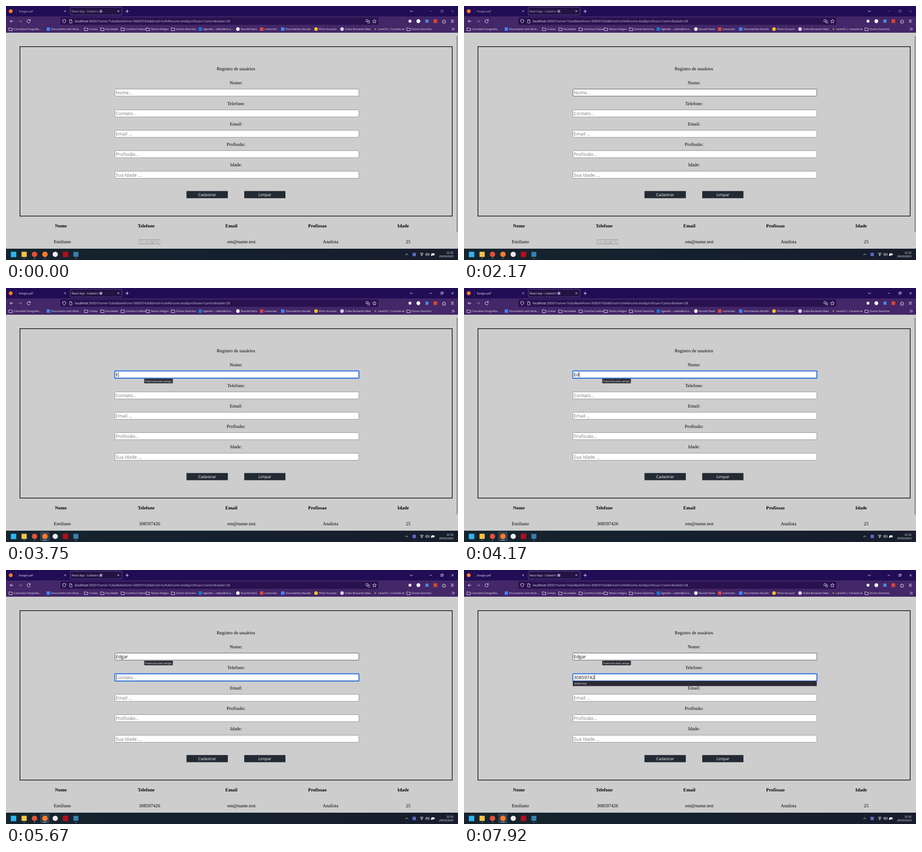
An HTML page that plays this animation: 998 px wide and 561 px high, repeating every 8 s.

```html
<!DOCTYPE html>
<html lang="pt-BR">
<head>
<meta charset="utf-8">
<title>Cadastro</title>
<style>
html, body { margin: 0; width: 100%; height: 100%; overflow: hidden; background: #cdcdcd; }
svg { display: block; width: 998px; height: 561px; }
text { font-family: "Open Sans", "Noto Sans", sans-serif; text-rendering: geometricPrecision; white-space: pre; }
.page { font-family: "Liberation Serif", "Times New Roman", serif; font-size: 10.4px; text-anchor: middle; }
.bold { font-weight: bold; }
.field { font-size: 10.1px; }
</style>
</head>
<body>
<svg id="stage" viewBox="0 0 998 561"></svg>
<script>
const LOOP = 8000;
const PHONE = '308597426';
const FIELD_Y = [183.5, 229.5, 274.5, 319.5, 365];
const HINTS = ['Nome...', 'Contato...', 'Email ...', 'Profissão...', 'Sua Idade ...'];
const LABELS = ['Nome:', 'Telefone:', 'Email:', 'Profissão:', 'Idade:'];

const rect = (x, y, w, h, fill, more = '') =>
  `<rect x="${x}" y="${y}" width="${w}" height="${h}" fill="${fill}" ${more}/>`;
const dot = (x, y, r, fill, more = '') => `<circle cx="${x}" cy="${y}" r="${r}" fill="${fill}" ${more}/>`;
const box = (x, y, size, fill) => rect(x - size / 2, y - size / 2, size, size, fill, 'rx="1"');
const line = (d, color = '#f4f0fa', width = 1, more = '') =>
  `<path d="${d}" fill="none" stroke="${color}" stroke-width="${width}" ${more}/>`;
const text = (x, y, s, size, fill = '#f4f0fa', more = '') =>
  `<text x="${x}" y="${y}" font-size="${size}" fill="${fill}" ${more}>${s.replace(/&/g, '&amp;')}</text>`;
const page = (x, y, s, more = '', bold = '') =>
  `<text x="${x}" y="${y}" class="page ${bold}" ${more}>${s}</text>`;
const cross = (x, y, r, more) => line(`M${x - r} ${y - r}l${2 * r} ${2 * r}m0 ${-2 * r}l${-2 * r} ${2 * r}`, '#f4f0fa', .9, more);
const folder = x => line(`M${x} 48.2h2.8l1 1h3.7v5.3h-7.5z`, '#f4f0fa', .9);

function tabBar() {
  return rect(0, 0, 998, 23.5, '#210d56') +
    dot(10.5, 11.5, 4.3, '#ff7a2f') +
    line('M22.5 3v17', '#4b3a78', .6) +
    rect(142, 2.5, 114, 17.5, '#231343', 'rx="2" stroke="#75659b" stroke-width=".8"') +
    '<g id="titles">' +
    text(28.5, 14, 'Estagio.pdf', 6) + text(145, 14, 'React App - Cadastro', 6.07) +
    box(209.5, 11.7, 6, '#a98bd6') + '</g>' +
    cross(130.5, 11.5, 1.8) + cross(248, 11.5, 1.8) +
    line('M264 11.7h7m-3.5-3.5v7') + line('M891.8 10l3.2 3.2 3.2-3.2') +
    '<g id="controls">' + line('M935.5 11.7h5', '#f4f0fa', .8) +
    rect(960, 10, 4, 4, 'none', 'stroke="#f4f0fa" stroke-width=".8"') +
    line('M961.3 10v-1.2h4v4h-1.3', '#f4f0fa', .7) + cross(986, 11.7, 2.4) + '</g>';
}

function toolbar() {
  const url = `localhost:3000/?name=Tubal&telefone=${PHONE}&Email=tu%40nume.test&profissao=Cantor&idade=28`;
  const dim = 'opacity=".4"';
  return rect(0, 23, 998, 36, '#432768') +
    rect(120, 25.2, 702, 16.2, '#29124f', 'rx="2"') +
    line('M16 33.7h-7m3-3l-3 3 3 3') + line('M27.5 33.7h7m-3-3l3 3-3 3', '#f4f0fa', 1, dim) +
    line('M53 31.6a3.6 3.6 0 1 0 .5 3M53.6 29.5v2.7h-2.7') +
    line('M128.5 29.5l3.3 1.3c.2 3.500-1 5.500-3.300 6.900c-2.300-1.400-3.500-3.400-3.300-6.900z') +
    line('M140.500 30h3.200l2 2v5.500h-5.200zm3 0v2.200h2', '#f4f0fa', .8) +
    `<text x="152" y="36.300" font-size="7" fill="#cfc5df"><tspan fill="#fff">localhost</tspan>${url.slice(9).replace(/&/g, '&amp;')}</text>` +
    line('M794.800 30h4.500v4.500h-4.500zm4 3h4.200v4.500h-4.200z', '#d9d0e8', .9) +
    line('M813.500 29.500l1.200 2.700 3 .3-2.200 2 .6 3-2.600-1.500-2.600 1.500.6-3-2.200-2 3-.3z', '#f4f0fa', .9) +
    box(892, 33.5, 6, '#eee8f6') + dot(910.5, 33.5, 4.2, '#fff') + box(929.5, 33.5, 7, '#4b86dc') + box(948, 33.5, 8, '#dc4530') +
    line('M964 32.200h2c-.6-2 2.400-2 1.900 0h2v1.800c1.800-.5 1.800 2.300 0 1.900v1.800h-5.900v-1.800c2 .4 2-2.400 0-1.900z', '#f4f0fa', .9) +
    line('M982.500 31h6m-6 2.500h6m-6 2.500h6', '#f4f0fa', .9);
}

function bookmarks() {
  const folders = [[6.5, 'Consultas Fotografia...'], [173, 'Contas'], [209, 'Faculdade'], [254, 'Cozinha Criativa'],
    [309.5, 'Textos Antigos'], [365, 'Outros favoritos'], [885, 'Outros favoritos']];
  const links = [[93.5, 'Documento sem título...', '#4285f4'], [429, 'Agendix – calendário e...', '#1c78cf'],
    [512, 'Nuvole Pasta', '#eef1f7', 1], [564.5, 'nume.test', '#e2483b'], [611, 'Documentos Nuvole', '#4285f4'],
    [684.5, 'Plimo Account', '#f5c32c', 1], [742, 'Clube Burvantis Mais', '#d9d0e8', 1], [815.5, 'LerenTo | Conecte-se', '#a57b5a']];
  return folders.map(([x, s]) => folder(x) + text(x + 10.3, 53.3, s, 5.85)).join('') +
    links.map(([x, s, color, round]) =>
      (round ? dot(x, 51, 3.9, color) : box(x, 51, x > 800 ? 3.5 : 7.4, color)) + text(x + 6.3, 53.3, s, 5.85)).join('') +
    line('M984.500 48.200l2.800 2.800-2.800 2.800m3.200-5.600l2.800 2.800-2.800 2.800');
}

function form() {
  const button = (x, w, s) => rect(x, 408.7, w, 15.8, '#232a34') +
    text(x + w / 2, 420, s, 8.75, '#fff', 'text-anchor="middle"');
  const fields = FIELD_Y.map((y, i) =>
    page(508, y - 10.9, LABELS[i]) +
    rect(240.5, y, 538.5, 15.5, '#fff', `id="frame${i}" rx="1" stroke="#8f8f9d" stroke-width="1"`) +
    `<text id="value${i}" class="field" x="242.3" y="${y + 11.5}" fill="#757575">${HINTS[i]}</text>`).join('');
  return rect(30.75, 89.75, 954.5, 374.2, 'none', 'stroke="#111" stroke-width="1.5"') +
    page(507.7, 141.5, 'Registro de usuários') + fields +
    button(398.5, 91.3, 'Cadastrar') + button(526, 91, 'Limpar');
}

function table() {
  const head = [[121.3, 'Nome'], [309.5, 'Telefone'], [497.5, 'Email'], [687.5, 'Profissao'], [877, 'Idade']];
  const row = [[124.5, 'Emiliano'], [519.8, 'em@nume.test'], [716.5, 'Analista'], [888, '25']];
  return head.map(([x, s]) => page(x, 488.5, s, '', 'bold')).join('') +
    row.map(([x, s]) => page(x, 524.3, s)).join('') +
    rect(293.3, 515, 47.5, 11.3, '#adadad', 'id="selection"') +
    page(317, 524.3, PHONE, 'id="phone"');
}

function taskbar() {
  const mark = x => rect(x - 1.5, 556.7, 3, 1.3, '#9aa3ad', 'rx=".6"');
  return '<defs><linearGradient id="bar"><stop stop-color="#15242d"/><stop offset=".5" stop-color="#15202e"/>' +
    '<stop offset="1" stop-color="#171d2c"/></linearGradient></defs>' +
    rect(0, 536, 998, 25, 'url(#bar)') +
    '<g id="active">' + rect(75.5, 538, 20.5, 21, '#34404d', 'rx="2"') + rect(81.5, 556.7, 8.5, 1.4, '#64b9ea', 'rx=".7"') + '</g>' +
    box(16.7, 548.7, 12, '#2fb4f0') + box(40, 548.5, 11.5, '#f5c344') + dot(63, 548.5, 6, '#e2503c') +
    dot(86, 548.5, 6, '#ff7a2f') + dot(108.7, 548.5, 5.8, '#f1ecf6') + box(131.5, 548.5, 12, '#b0101b') + box(154.3, 548.5, 11, '#377fae') +
    mark(40) + mark(63) + '<g id="idle">' + mark(86) + '</g>' + mark(154.3) +
    line('M882 550l2.700-2.700 2.700 2.700') + box(901.3, 548.7, 7.5, '#5b67c7') +
    line('M914 547.200a5.700 5.700 0 0 1 8 0m-6.500 1.700a3.600 3.600 0 0 1 5 0') + dot(918, 550.8, 1.2, '#fff') +
    line('M926.500 547.300h1.500l2-1.700v6l-2-1.700h-1.500zm5.500-.5q1.500 1.800 0 3.600m1.500-5q2.600 3.200 0 6.400', '#fff', .8) +
    rect(939.5, 546.2, 6, 4.5, '#fff', 'rx=".8"') + rect(946, 547.5, 1, 2, '#fff') + dot(940, 550, 1.8, '#fff') +
    text(988, 547, '22:32', 6, '#fff', 'text-anchor="end"') + text(988, 555, '29/03/2023', 6, '#fff', 'text-anchor="end"');
}

function overlays() {
  return rect(995, 65.5, 2, 434.5, '#858585', 'id="scroll" rx="1"') +
    rect(239.6, 0, 540.3, 17.3, 'none', 'id="glow" rx="2" stroke="#8ab0ea" stroke-width="2.4"') +
    rect(240.5, 0, 538.5, 15.5, 'none', 'id="ring" rx="1" stroke="#1559c8" stroke-width="1.3"') +
    rect(0, 0, .7, 11.5, '#000', 'id="caret"') +
    '<g id="tip">' + rect(305.3, 200.5, 63, 9.700, '#2b2a33', 'rx="1" stroke="#55545e" stroke-width=".6"') +
    text(307, 207.6, 'Preencha este campo.', 5.85, '#fbfbfe') + '</g>' +
    '<g id="list">' + rect(240.3, 0, 538.5, 10.800, '#2b2a33', 'stroke="#45444e" stroke-width=".5"') +
    '<text id="option" x="243" y="7.4" font-size="5.45" fill="#fbfbfe"></text></g>' +
    '<path id="mouse" d="M0 0v8.200l1.900-1.700 1.200 2.700 1.300-.6-1.200-2.600h2.600z" fill="#fff" stroke="#222" stroke-width=".7"/>';
}

document.getElementById('stage').innerHTML =
  rect(0, 0, 998, 561, '#cdcdcd') + tabBar() + toolbar() + bookmarks() + form() + table() + overlays() + taskbar();

const el = id => document.getElementById(id);
const set = (id, name, value) => el(id).setAttribute(name, value);
const show = (id, on) => set(id, 'opacity', +on);
// Last value whose start time has passed
const pick = (t, keys) => keys.reduce((v, [start, next]) => t >= start ? next : v, keys[0][1]);

const NAME = [[0, ''], [3750, 'E'], [4080, 'Ed'], [4250, 'Edg'], [4420, 'Edga'], [5170, 'Edgar']];
const CONTACT = [[0, ''], [6830, PHONE], [7920, PHONE.slice(0, -1)]];
const SCROLL = [[0, 1], [580, .5], [750, 0], [1580, 1], [5170, .8], [5420, .4], [5500, 0]];
const CARET = [[0, 0], [2330, 1], [2830, 0], [3420, 1], [5000, 0], [5170, 1], [5420, 0],
  [5670, 1], [6170, 0], [6670, 1], [7250, 0], [7750, 1]];
const LIST = [[0, -1], [3830, 0], [4170, -1], [6920, 1]];

function moveMouse(t) {
  const u = Math.min(1, Math.max(0, Math.floor((t - 1580) / 83) / 7));
  const p = u * u * (3 - 2 * u);
  const x = 699 - 393 * p, y = 300 - 109 * p;
  const hover = y < 199;
  set('mouse', 'transform', `translate(${x} ${y})`);
  show('mouse', t >= 1580 && !hover);
  set('frame0', 'stroke', hover ? '#55555f' : '#8f8f9d');
}

function fill(i, s) {
  el('value' + i).textContent = s || HINTS[i];
  set('value' + i, 'fill', s ? '#111' : '#757575');
}

function draw(t) {
  const active = t >= 2330, focus = t < 5670 ? 0 : 1;
  const values = [pick(t, NAME), pick(t, CONTACT)];
  values.forEach((s, i) => fill(i, s));
  moveMouse(t);

  show('scroll', pick(t, SCROLL));
  set('titles', 'opacity', active ? 1 : .75);
  set('controls', 'opacity', active ? 1 : .45);
  show('active', active);
  show('idle', !active);
  show('selection', !active);
  set('phone', 'fill', active ? '#000' : '#fff');

  const y = FIELD_Y[focus];
  set('ring', 'y', y);
  set('glow', 'y', y - .9);
  show('ring', active);
  show('glow', active);
  const width = values[focus] ? el('value' + focus).getComputedTextLength() : .7;
  set('caret', 'x', 242.3 + width);
  set('caret', 'y', y + 2);
  show('caret', pick(t, CARET));

  show('tip', t >= 3080);
  const list = pick(t, LIST);
  show('list', list >= 0);
  set('list', 'transform', `translate(0 ${FIELD_Y[Math.max(0, list)] + 15.8})`);
  el('option').textContent = list ? PHONE : 'Emiliano';
}

const start = performance.now();
function tick() {
  draw((performance.now() - start) % LOOP);
  requestAnimationFrame(tick);
}
tick();
</script>
</body>
</html>
```
